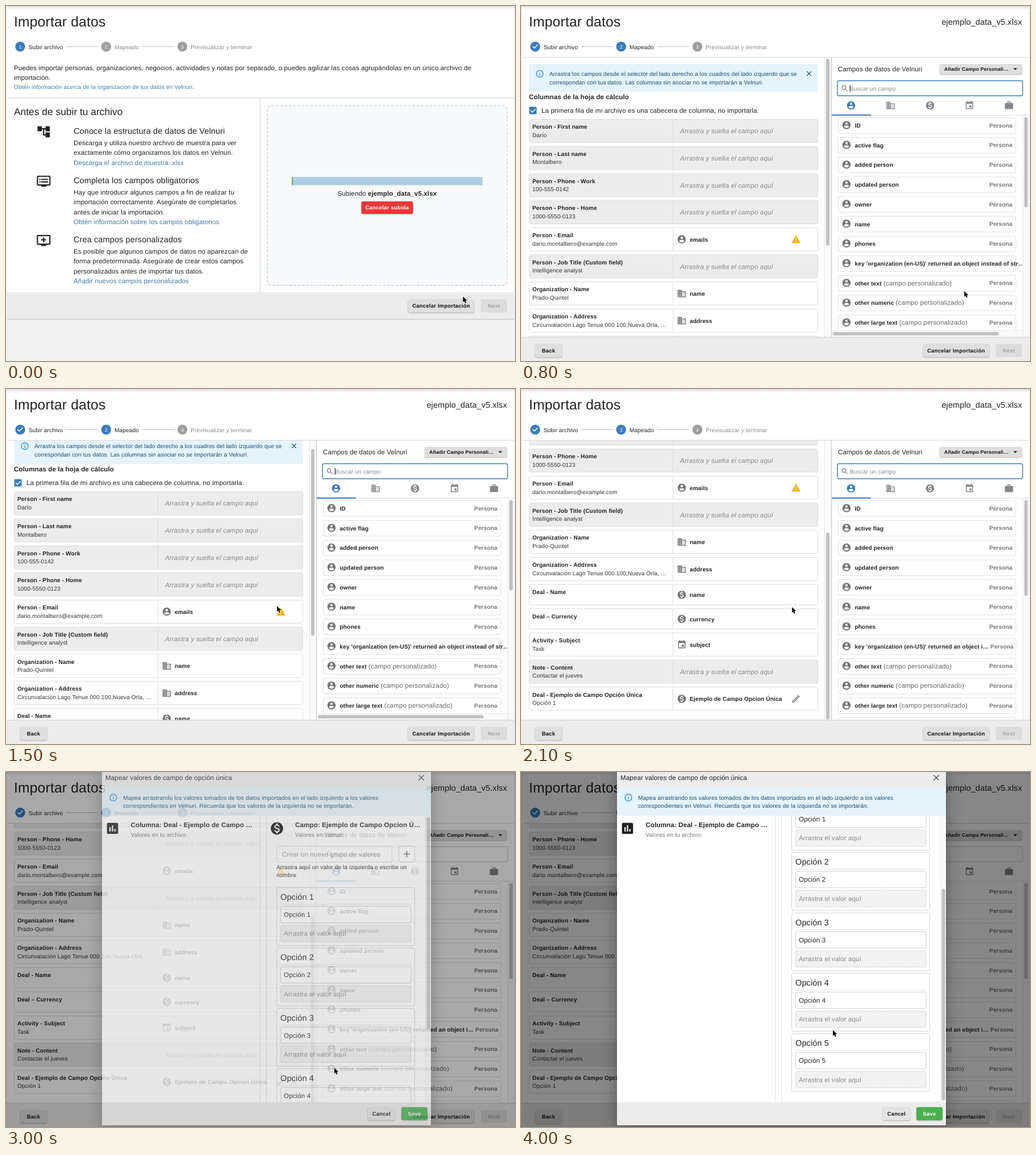
An HTML page for the animation above (4100 ms loop, 896x625 px).

```html
<!DOCTYPE html>
<html lang="es">
<head>
<meta charset="utf-8">
<title>Importar datos</title>
<style>
html, body { margin: 0; width: 100%; height: 100%; overflow: hidden; background: #f2f2f2; }
svg { display: block; width: 896px; height: 625px; }
text { font-family: "Liberation Sans", Arial, Helvetica, sans-serif; white-space: pre; text-rendering: geometricPrecision; }
.h4 { font-size: 24.65px; letter-spacing: .181px; }
.h5 { font-size: 17.4px; }
.h6 { font-size: 14.5px; letter-spacing: .109px; }
.b1 { font-size: 11.6px; letter-spacing: .109px; }
.b2 { font-size: 10.15px; letter-spacing: .109px; }
.btn { font-size: 9.425px; letter-spacing: .269px; font-weight: 700; }
.num { font-size: 8.7px; }
.small { font-size: 8.7px; letter-spacing: .16px; font-weight: 700; }
.bold { font-weight: 700; }
.it { font-style: italic; }
.mid { text-anchor: middle; }
.end { text-anchor: end; }
.raised { filter: drop-shadow(0 1.5px 1px rgba(0,0,0,.28)); }
.dialog { filter: drop-shadow(0 8px 14px rgba(0,0,0,.32)); }
</style>
</head>
<body>
<svg id="stage" viewBox="0 0 896 625"></svg>
<script>
const INK = '#222', GREY = '#8a8a8a', BLUE = '#3a7cbb', LINK = '#4179a9', NAVY = '#174a73', BAR = '#ececec';
const SIZE = { h4: 24.65, h5: 17.4, h6: 14.5, b1: 11.6, b2: 10.15, btn: 9.425, num: 8.7, small: 8.7 };
const DISC = 'M12 2C6.48 2 2 6.48 2 12s4.48 10 10 10 10-4.48 10-10S17.52 2 12 2z';
const ICON = {
  tree: 'M22 11V3h-7v3H9V3H2v8h7V8h2v10h4v3h7v-8h-7v3h-2V8h2v3z',
  screen: 'M21 3H3c-1.1 0-2 .9-2 2v12c0 1.1.9 2 2 2h5v2h8v-2h5c1.1 0 2-.9 2-2V5c0-1.1-.9-2-2-2zm0 14H3V5h18v12z',
  lines: 'M19 8H8v2h11V8zm0 4H8v2h11v-2zM7 8H5v2h2V8zm0 4H5v2h2v-2z',
  plus: 'M16 10v2h-3v3h-2v-3H8v-2h3V7h2v3h3z',
  person: DISC + 'm0 3c1.66 0 3 1.34 3 3s-1.34 3-3 3-3-1.34-3-3 1.34-3 3-3zm0 14.2c-2.5 0-4.71-1.28-6-3.22.03-1.99 4-3.08 6-3.08 1.99 0 5.97 1.09 6 3.08-1.29 1.94-3.5 3.22-6 3.22z',
  org: 'M12 7V3H2v18h20V7H12zM6 19H4v-2h2v2zm0-4H4v-2h2v2zm0-4H4V9h2v2zm0-4H4V5h2v2zm4 12H8v-2h2v2zm0-4H8v-2h2v2zm0-4H8V9h2v2zm0-4H8V5h2v2zm10 12h-8v-2h2v-2h-2v-2h2v-2h-2V9h8v10zm-2-8h-2v2h2v-2zm0 4h-2v2h2v-2z',
  deal: DISC + 'm1.41 16.09V20h-2.67v-1.93c-1.71-.36-3.16-1.46-3.27-3.4h1.96c.1 1.05.82 1.87 2.65 1.87 1.96 0 2.4-.98 2.4-1.59 0-.83-.44-1.61-2.67-2.14-2.48-.6-4.18-1.62-4.18-3.67 0-1.72 1.39-2.84 3.11-3.21V4h2.67v1.95c1.86.45 2.79 1.86 2.85 3.39H14.3c-.05-1.11-.64-1.87-2.22-1.87-1.5 0-2.4.68-2.4 1.64 0 .84.65 1.39 2.67 1.91s4.18 1.39 4.18 3.91c-.01 1.83-1.38 2.83-3.12 3.16z',
  event: 'M17 12h-5v5h5v-5zM16 1v2H8V1H6v2H5c-1.1 0-2 .9-2 2v14c0 1.1.9 2 2 2h14c1.1 0 2-.9 2-2V5c0-1.1-.9-2-2-2h-1V1h-2zm3 18H5V8h14v11z',
  work: 'M20 6h-4V4c0-1.1-.9-2-2-2h-4c-1.1 0-2 .9-2 2v2H4c-1.1 0-2 .9-2 2v11c0 1.1.9 2 2 2h16c1.1 0 2-.9 2-2V8c0-1.1-.9-2-2-2zm-6 0h-4V4h4v2z',
  warn: 'M1 21h22L12 2 1 21zm12-3h-2v-2h2v2zm0-4h-2v-4h2v4z',
  search: 'M15.5 14h-.79l-.28-.27C15.41 12.59 16 11.11 16 9.5 16 5.91 13.09 3 9.5 3S3 5.91 3 9.5 5.91 16 9.5 16c1.61 0 3.09-.59 4.23-1.57l.27.28v.79l5 4.99L20.49 19l-4.99-5zm-6 0C7.01 14 5 11.99 5 9.5S7.01 5 9.5 5 14 7.01 14 9.5 11.99 14 9.5 14z',
  edit: 'M14.06 9.02l.92.92L5.92 19H5v-.92l9.06-9.06M17.66 3c-.25 0-.51.1-.7.29l-1.83 1.83 3.75 3.75 1.83-1.83c.39-.39.39-1.02 0-1.41l-2.34-2.34c-.2-.2-.45-.29-.71-.29zm-3.6 3.19L3 17.25V21h3.75L17.81 9.94l-3.75-3.75z',
  chart: 'M19 3H5c-1.1 0-2 .9-2 2v14c0 1.1.9 2 2 2h14c1.1 0 2-.9 2-2V5c0-1.1-.9-2-2-2zM9 17H7v-7h2v7zm4 0h-2V7h2v10zm4 0h-2v-4h2v4z',
  close: 'M19 6.41L17.59 5 12 10.59 6.41 5 5 6.41 10.59 12 5 17.59 6.41 19 12 13.41 17.59 19 19 17.59 13.41 12z',
  done: 'M12 0a12 12 0 1 0 0 24 12 12 0 0 0 0-24zm-2 17l-5-5 1.4-1.4 3.6 3.6 7.6-7.6L19 8l-9 9z',
  info: 'M11 7h2v2h-2zM11 11h2v6h-2zM12 2a10 10 0 1 0 0 20 10 10 0 0 0 0-20zm0 18a8 8 0 1 1 0-16 8 8 0 0 1 0 16z'
};

// y is the middle of the capitals
const text = (x, y, str, cls = 'b2', fill = INK) =>
  `<text x="${x}" y="${y + .345 * SIZE[cls.split(' ')[0]]}" class="${cls}" fill="${fill}">${str}</text>`;
const rect = (x, y, w, h, fill, more = '') => `<rect x="${x}" y="${y}" width="${w}" height="${h}" fill="${fill}" ${more}/>`;
const box = (x, y, w, h, fill = '#fff', stroke = '#dcdcdc', more = '') =>
  rect(x + .5, y + .5, w - 1, h - 1, fill, `stroke="${stroke}" rx="2.5" ${more}`);
const line = (x1, y1, x2, y2, color = '#dedede', w = 1) =>
  `<path d="M${x1} ${y1}L${x2} ${y2}" stroke="${color}" stroke-width="${w}"/>`;
const icon = (name, x, y, fill = '#757575', s = .725) =>
  `<path transform="translate(${x - 12 * s} ${y - 12 * s}) scale(${s})" fill="${fill}" fill-rule="evenodd" d="${ICON[name]}"/>`;
const button = (x, y, w, h, label, bg = '#dfdfdf', fill = '#111', raised = true) =>
  rect(x, y, w, h, bg, `rx="3" ${raised ? 'class="raised"' : ''}`) + text(x + w / 2, y + h / 2, label, 'btn mid', fill);
const group = (id, body) => `<g id="${id}">${body}</g>`;
const clip = (id, x, y, w, h) => `<clipPath id="${id}">${rect(x, y, w, h, '#000')}</clipPath>`;
const thumb = (id, x, y, w, h) => rect(x, y, w, h, '#c1c1c1', `id="${id}" rx="3"`);

function stepper(active) {
  return [['Subir archivo', 25], ['Mapeado', 176.3], ['Previsualizar y terminar', 310.5]].map(([label, x], i) => {
    const mark = i < active ? icon('done', x, 71.5, BLUE)
      : `<circle cx="${x}" cy="71.5" r="8.7" fill="${i === active ? BLUE : '#9e9e9e'}"/>` + text(x, 71.5, i + 1, 'num mid', '#fff');
    const rail = i ? line(i === 1 ? 106 : 240, 71.5, i === 1 ? 162 : 296, 71.5, '#bdbdbd') : '';
    return mark + rail + text(x + 14.7, 72, label, 'b2', i <= active ? INK : GREY);
  }).join('');
}

function footer(y) {
  return button(708, y - 11.5, 116, 23, 'Cancelar Importación') + button(836, y - 11.5, 46, 23, 'Next', '#dcdcdc', '#a6a6a6', false);
}

function tip(y, iconName, title, lines, link) {
  const art = iconName === 'tree' ? icon('tree', 66.3, y + 1.5, INK, 1.09)
    : icon('screen', 66.3, y + 1.5, INK, 1.09) + icon(iconName, 66.3, y + 1.5, INK, 1.09);
  return art + text(119, y, title, 'h6') + lines.map((s, i) => text(119, y + 20.7 + i * 17.4, s, 'b1')).join('')
    + text(119, y + 20.7 + lines.length * 17.4, link, 'b1', LINK);
}

function uploadPage() {
  return rect(2, 0, 892, 551, '#fff') + text(14, 27.3, 'Importar datos', 'h4') + stepper(0)
    + text(14, 109, 'Puedes importar personas, organizaciones, negocios, actividades y notas por separado, o puedes agilizar las cosas agrupándolas en un único archivo de', 'b1')
    + text(14, 126.3, 'importación.', 'b1')
    + text(14, 142.7, 'Obtén información acerca de la organización de tus datos en Velnuri.', 'b2', LINK)
    + line(2, 162, 894, 162, '#e0e0e0', 1.5) + line(447.5, 162, 447.5, 504, '#e0e0e0', 1.5)
    + text(14, 186, 'Antes de subir tu archivo', 'h5')
    + tip(220, 'tree', 'Conoce la estructura de datos de Velnuri',
      ['Descarga y utiliza nuestro archivo de muestra para ver', 'exactamente cómo organizamos los datos en Velnuri.'], 'Descarga el archivo de muestra .xlsx')
    + tip(307, 'lines', 'Completa los campos obligatorios',
      ['Hay que introducir algunos campos a fin de realizar tu', 'importación correctamente. Asegúrate de completarlos', 'antes de iniciar la importación.'], 'Obtén información sobre los campos obligatorios')
    + tip(411.3, 'plus', 'Crea campos personalizados',
      ['Es posible que algunos campos de datos no aparezcan de', 'forma predeterminada. Asegúrate de crear estos campos', 'personalizados antes de importar tus datos.'], 'Añadir nuevos campos personalizados')
    + rect(460, 175.5, 422, 316.5, '#f7f9fb', 'rx="8" stroke="#cfd3d8" stroke-width="1.5" stroke-dasharray="4.5 3"')
    + rect(503, 301, 336, 14.5, '#b1cce6') + rect(503, 301, 2, 14.5, '#5cb860', 'id="progress"')
    + text(671, 329.5, 'Subiendo <tspan class="bold">ejemplo_data_v5.xlsx</tspan>', 'b1 mid')
    + button(625.5, 344, 91, 22, 'Cancelar subida', '#e53935', '#fff')
    + rect(2, 504, 892, 47, BAR) + line(2, 551.5, 894, 551.5, '#bdbdbd', 1.2) + footer(528);
}

const notice = (x, y, a, b) => icon('info', x, y, '#2f8fd0', .665) + text(x + 17, y + .3, a, 'b2', NAVY) + text(x + 17, y + 14.8, b, 'b2', NAVY);

const ROWS = [
  ['Person - First name', 'Darío'],
  ['Person - Last name', 'Montalbero'],
  ['Person - Phone - Work', '100-555-0142'],
  ['Person - Phone - Home', '1000-5550-0123'],
  ['Person - Email', 'dario.montalbero@example.com', 'person', 'emails'],
  ['Person - Job Title (Custom field)', 'Intelligence analyst'],
  ['Organization - Name', 'Prado-Quintel', 'org', 'name'],
  ['Organization - Address', 'Circunvalación Lago Tenue 000 100,Nueva Orla, …', 'org', 'address'],
  ['Deal - Name', '', 'deal', 'name'],
  ['Deal – Currency', '', 'deal', 'currency'],
  ['Activity - Subject', 'Task', 'event', 'subject'],
  ['Note - Content', 'Contactar el jueves'],
  ['Deal - Ejemplo de Campo Opción Única', 'Opción 1', 'deal', 'Ejemplo de Campo Opcion Única']
];

function columnRows() {
  let y = 199;
  return ROWS.map(([title, sample, art, field]) => {
    const h = sample ? 41.9 : 36.9, mid = y + h / 2 + .3;
    let out = box(14, y, 509, h, art ? '#fff' : BAR) + line(267.5, y, 267.5, y + h, '#dcdcdc')
      + text(20, y + 13.7, title, 'b2 bold') + text(20, y + 28.2, sample, 'b2', '#333');
    out += art ? icon(art, 283, mid - .2) + text(297, mid, field, 'b2 bold')
      : text(280, mid, 'Arrastra y suelta el campo aquí', 'b1 it', GREY);
    if (field === 'emails') out += icon('warn', 484, mid, '#f5b010');
    if (sample === 'Opción 1') out += icon('edit', 484, mid) + group('clear', icon('close', 507, mid, '#757575', .65));
    y += h + 5.8;
    return out;
  }).join('');
}

const FIELDS = ['ID', 'active flag', 'added person', 'updated person', 'owner', 'name', 'phones', 'key', 'other text', 'other numeric', 'other large text', ''];

function fieldList(wide) {
  const key = "key 'organization (en-US)' returned an object " + (wide ? 'instead of str…' : 'i…');
  return FIELDS.map((name, i) => {
    const y = 210.2 + i * 34.72, custom = name.startsWith('other'), long = name === 'key';
    if (!name && wide) return '';
    return box(558, y - 14, 313.5, 28.5, '#fff', '#e0e0e0') + icon('person', 573, y - .5)
      + text(587.5, y + .3, (long ? key : name) + (custom ? '<tspan class="b1" font-weight="400" fill="#666"> (campo personalizado)</tspan>' : ''), 'b2 bold')
      + (long && wide ? '' : text(long ? 867 : 865, y, 'Persona', 'b2 bold end', '#757575'));
  }).join('');
}

function mappingPage() {
  const tabs = ['person', 'org', 'deal', 'event', 'work'];
  return rect(2, 0, 892, 583, '#fff') + text(14, 27.3, 'Importar datos', 'h4') + text(882, 27.5, 'ejemplo_data_v5.xlsx', 'h6 end') + stepper(1)
    + line(2, 90.3, 894, 90.3, '#dcdcdc', 1.3)
    + '<g clip-path="url(#leftClip)">' + group('columns',
      rect(14, 102, 508.5, 49, '#e5f3fd', 'rx="2.5"')
      + notice(33, 119.3, 'Arrastra los campos desde el selector del lado derecho a los cuadros del lado izquierdo que se', 'correspondan con tus datos. Las columnas sin asociar no se importarán a Velnuri.')
      + icon('close', 507, 119, NAVY, .6)
      + text(14, 160, 'Columnas de la hoja de cálculo', 'b1 bold')
      + rect(14.5, 177.5, 13, 13, BLUE, 'rx="1.5"') + '<path d="M17 184l3 3 5.3-5.6" fill="none" stroke="#fff" stroke-width="1.5"/>'
      + text(36, 184, 'La primera fila de mi archivo es una cabecera de columna, no importarla.', 'b1')
      + columnRows()) + '</g>'
    + rect(534, 91, 12, 492, '#fafafa') + line(534.5, 91, 534.5, 583, '#e6e6e6') + thumb('leftThumb', 537, 93, 6, 329)
    + line(546.5, 91, 546.5, 583, '#cfcfcf', 1.4)
    + text(558, 110.5, 'Campos de datos de Velnuri', 'b1')
    + rect(737, 102, 145, 18, '#dedede', 'rx="3" class="raised"') + text(745, 111, 'Añadir Campo Personali…', 'small', '#111')
    + '<path d="M866.5 109.5h7l-3.5 3.5z" fill="#222"/>'
    + rect(557, 131.5, 326, 26.5, '#fff', 'id="searchBox" rx="3"') + icon('search', 570, 145, '#757575', .6)
    + text(579, 145, 'Buscar un campo', 'b2', GREY) + rect(578.7, 139, 1, 12, '#111', 'id="caret"')
    + tabs.map((name, i) => icon(name, 581 + i * 69.5, 175, i ? '#858585' : BLUE)).join('')
    + line(547, 192.3, 894, 192.3, '#dcdcdc') + rect(547, 191, 69, 2, BLUE)
    + '<g clip-path="url(#listClip)">' + group('listNarrow', fieldList(false))
    + group('listWide', fieldList(true) + rect(547, 571.5, 337, 11.5, '#fafafa') + line(547, 571.5, 883, 571.5, '#e6e6e6') + thumb('wideThumb', 549, 574, 292, 6)) + '</g>'
    + rect(883, 193, 11, 390, '#fafafa') + line(883.5, 193, 883.5, 583, '#e6e6e6') + thumb('rightThumb', 886, 195.5, 6, 159)
    + rect(0, 583, 896, 42, BAR) + line(0, 583, 896, 583, '#cfcfcf', 1.2)
    + button(25, 595, 47, 23, 'Back') + footer(606.3);
}

function optionCard(i) {
  const y = 203 + i * 106.3, name = 'Opción ' + (i + 1);
  return box(476, y, 244, 103, '#fff', '#d2d2d2') + text(483, y + 17, name, 'h6') + line(483, y + 30, 713.5, y + 30, '#e2e2e2')
    + box(483, y + 33, 230.5, 30, '#fff', '#cfcfcf') + text(489, y + 48, name, 'b1')
    + box(483, y + 66.3, 230.5, 30, '#f2f2f2', '#cacaca', 'stroke-dasharray="2 1.2"') + text(489, y + 81.3, 'Arrastra el valor aquí', 'b1', GREY);
}

function dialog() {
  return rect(169, -6, 579, 628, '#fff', 'rx="3" class="dialog"') + rect(169, 0, 579, 28, '#ececec')
    + text(175, 10, 'Mapear valores de campo de opción única', 'b1') + icon('close', 731, 10, '#555')
    + rect(169, 28, 579, 49, '#e5f3fd')
    + notice(189, 45, 'Mapea arrastrando los valores tomados de los datos importados en el lado izquierdo a los valores', 'correspondientes en Velnuri. Recuerda que los valores de la izquierda no se importarán.')
    + icon('chart', 187.5, 99.3, INK, 1.09) + text(219.5, 92.5, 'Columna: Deal - Ejemplo de Campo …', 'b1 bold')
    + text(219.5, 110.5, 'Valores en tu archivo:', 'b2', '#757575')
    + line(447.5, 77, 447.5, 581) + line(458.5, 77, 458.5, 581)
    + '<g clip-path="url(#dialogClip)">' + group('options',
      icon('deal', 477, 99.3, '#111', 1.09) + text(509, 92.5, 'Campo: Ejemplo de Campo Opcion Ú…', 'b1 bold')
      + text(509, 110.5, 'Valores en Velnuri:', 'b2', '#757575')
      + box(476, 130, 204, 29, '#fff', '#c4c4c4', 'stroke-dasharray="2 1.2"') + text(486, 144.8, 'Crear un nuevo grupo de valores', 'b1', '#999')
      + box(691, 130, 29, 29, '#fff', '#cfcfcf') + line(700, 144.5, 711, 144.5, '#555', 1.3) + line(705.5, 139, 705.5, 150, '#555', 1.3)
      + text(476, 167, 'Arrastra aquí un valor de la izquierda o escribe un') + text(476, 181.5, 'nombre')
      + [0, 1, 2, 3, 4].map(optionCard).join('')) + '</g>'
    + rect(738, 77, 10, 504, '#fafafa') + line(738.5, 77, 738.5, 581, '#e6e6e6') + thumb('dialogThumb', 740.5, 79.5, 6, 373)
    + rect(169, 581, 579, 41, BAR, 'rx="2"')
    + button(637, 590, 48, 23, 'Cancel', '#e4e4e4') + button(696, 590, 46, 23, 'Save', '#4caf50', '#fff');
}

const stage = document.getElementById('stage');
stage.innerHTML = '<defs>' + clip('leftClip', 2, 91, 532, 492) + clip('listClip', 547, 193, 336, 390) + clip('dialogClip', 459, 77, 279, 504)
  + '<linearGradient id="topShade" x2="0" y2="1"><stop stop-color="#d9d9d9"/><stop offset="1" stop-color="#fff" stop-opacity="0"/></linearGradient></defs>'
  + rect(0, 0, 896, 625, '#f2f2f2') + group('upload', uploadPage()) + group('mapping', mappingPage())
  + rect(0, 0, 896, 9, 'url(#topShade)') + rect(0, 0, 896, 625, '#000', 'id="backdrop"') + group('dialog', dialog())
  + group('cursor', '<path d="M0 0V10l2.3-2 1.5 3.5 1.9-.8-1.5-3.4 3-.2z" fill="#000" stroke="#fff" stroke-width=".8" paint-order="stroke"/>');
const $ = id => document.getElementById(id);

const linear = k => k, smooth = k => k * k * (3 - 2 * k);
// keys: [time, ...values]
function at(keys, t, ease = linear) {
  const next = keys.findIndex(k => k[0] > t);
  if (next < 0) return keys[keys.length - 1].slice(1);
  if (!next) return keys[0].slice(1);
  const a = keys[next - 1], b = keys[next], k = ease((t - a[0]) / (b[0] - a[0]));
  return a.slice(1).map((v, i) => v + (b[i + 1] - v) * k);
}

const POINTER = [[700, 804.5, 511.5], [1300, 477, 382], [1800, 477, 382], [2000, 477, 384], [2100, 477, 384], [2600, 483, 543], [2700, 483, 543], [3000, 578, 521], [3100, 577.5, 520], [3600, 577.5, 520], [4000, 549, 454.5]];
const PROGRESS = [[0, 2], [100, 90], [200, 220], [300, 336]];
const COLUMN_SCROLL = [[1300, 0], [1400, 6], [1500, 18.8], [1600, 95], [1700, 190], [1800, 237]];
const OPTION_SCROLL = [[3600, 0], [3700, 40], [3800, 100], [3900, 148], [4000, 168]];
const FADE = [[2855, 0], [3055, 1]];
const DIM = .47;

const show = (id, on) => $(id).setAttribute('display', on ? 'inline' : 'none');
const move = (id, x, y) => $(id).setAttribute('transform', `translate(${x} ${y})`);

function draw(ms) {
  const t = Math.floor(ms % 4100 / 100) * 100, focused = t < 2800;
  const [columnY] = at(COLUMN_SCROLL, t), [optionY] = at(OPTION_SCROLL, t), [fade] = at(FADE, t);
  show('upload', t < 400);
  show('mapping', t >= 400);
  $('progress').setAttribute('width', at(PROGRESS, t)[0]);
  move('columns', 0, -columnY);
  move('leftThumb', 0, columnY * .675);
  show('listWide', t < 1700);
  show('listNarrow', t >= 1700);
  $('rightThumb').setAttribute('height', t < 1700 ? 159 : 169);
  show('clear', t >= 2500);
  show('caret', focused && Math.floor((t - 300) / 600) % 2 === 0);
  $('searchBox').setAttribute('stroke', focused ? BLUE : '#c4c4c4');
  $('searchBox').setAttribute('stroke-width', focused ? 1.4 : 1);
  $('backdrop').setAttribute('opacity', DIM * fade);
  $('dialog').setAttribute('opacity', fade);
  show('dialog', fade > 0);
  move('options', 0, -optionY);
  move('dialogThumb', 0, optionY * .75);
  move('cursor', ...at(POINTER, t, smooth));
}

const start = performance.now();
function tick() {
  draw(performance.now() - start);
  requestAnimationFrame(tick);
}
tick();
</script>
</body>
</html>
```
